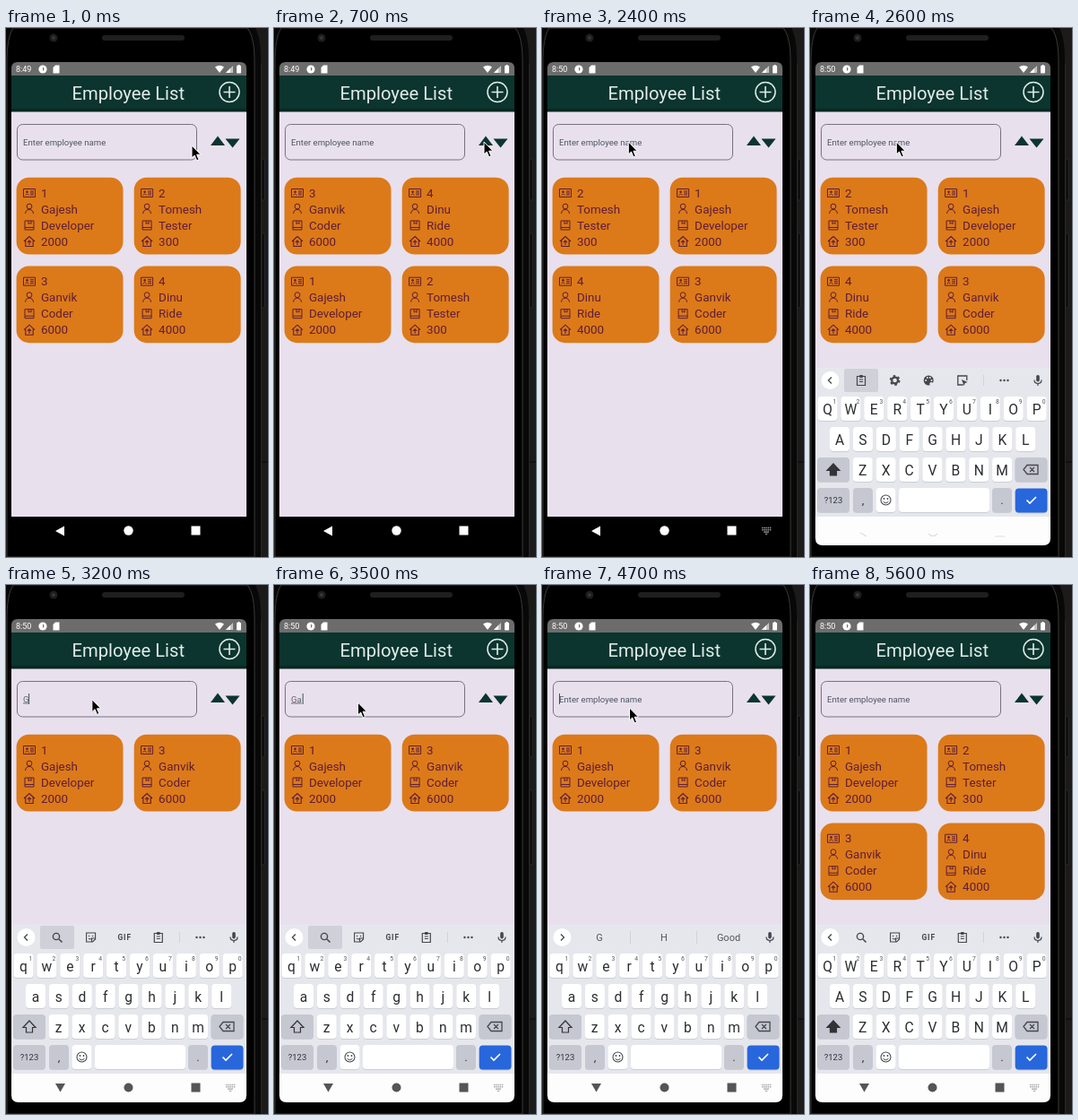
An HTML page for the animation above (5.8 s loop, 292 by 590 pixels).

```html
<!DOCTYPE html>
<html lang="en">
<head>
<meta charset="utf-8">
<title>Employee List</title>
<style>
html, body { margin: 0; width: 100%; height: 100%; overflow: hidden; background: #1c1b19; }
svg { display: block; width: 292px; height: 590px; font-family: Roboto, Arial, sans-serif; }
</style>
</head>
<body>
<svg id="stage" viewBox="0 0 292 590"></svg>
<script>
const LOOP = 5800, STEP = 100;
const stage = document.getElementById('stage');
const GREEN = '#0b352e', INK = '#5f1d35', KEY = '#45474d';

const people = {
  1: ['Gajesh', 'Developer', 2000],
  2: ['Tomesh', 'Tester', 300],
  3: ['Ganvik', 'Coder', 6000],
  4: ['Dinu', 'Ride', 4000]
};

// [time, value] lists: the last entry reached is the current value
const pick = (list, t) => list.filter(e => e[0] <= t).pop()[1];
const orders = [[0, [1, 2, 3, 4]], [500, [3, 4, 1, 2]], [1400, [2, 1, 4, 3]], [3200, [1, 3]], [4900, [1, 2, 3, 4]]];
const typed = [[0, ''], [3200, 'G'], [3400, 'Ga'], [4300, 'G'], [4600, '']];
const pointer = [[0, 207, 131], [300, 234, 127], [700, 234, 127], [1200, 250, 129], [1800, 250, 129],
  [2300, 96.3, 127], [3100, 96.3, 127], [3500, 93.5, 131], [4200, 93.5, 131], [4700, 97.5, 137], [4900, 97.5, 137], [5400, 270, 122]];

const rect = (x, y, w, h, fill, r = 0, more = '') =>
  `<rect x="${x}" y="${y}" width="${w}" height="${h}" rx="${r}" fill="${fill}" ${more}/>`;
const disc = (x, y, r, fill, more = '') => `<circle cx="${x}" cy="${y}" r="${r}" fill="${fill}" ${more}/>`;
const shape = (d, fill, more = '') => `<path d="${d}" fill="${fill}" ${more}/>`;
const line = (d, color, w = 1) => shape(d, 'none', `stroke="${color}" stroke-width="${w}"`);
const text = (x, y, s, size, fill, more = '') =>
  `<text x="${x}" y="${y}" font-size="${size}" fill="${fill}" ${more}>${s}</text>`;
const mid = (x, y, s, size, fill, more = '') => text(x, y, s, size, fill, 'text-anchor="middle" ' + more);
const at = (x, y, body) => `<g transform="translate(${x} ${y})">${body}</g>`;

function phone() {
  return rect(0, 0, 292, 590, '#1c1b19') +
    shape('M-4 0H278C283 10 284 22 284 40V590H-4Z', '#080808') +
    shape('M8 0C3 8 1 20 1 40V590H277V40C277 20 275 8 269 0Z', '#000', 'stroke="#3a3a38"') +
    line('M284.5 40V590', '#292825') +
    rect(285, 146, 3, 46, '#090909', 1, 'stroke="#3b3a36" stroke-width=".6"') +
    rect(285, 229, 3, 83, '#090909', 1, 'stroke="#3b3a36" stroke-width=".6"') +
    rect(285, 483.5, 7, 1, '#080808') +
    disc(53, 11, 4.5, '#1d1d1f') + disc(53, 11, 2, '#36363b') +
    rect(107, 8, 92, 6, '#1f1f1f', 3);
}

function topBar(t) {
  return shape('M6 53V45Q6 38 13 38H261Q268 38 268 45V53Z', '#6d6c6d') +
    text(11, 49, t < 900 ? '8:49' : '8:50', 9, '#fff') +
    disc(41, 46, 4.6, '#fff') + shape('M41 43.5A2.5 2.5 0 0 1 41 48Z', '#6d6c6d') +
    shape('M52.5 44L55 41.5H59.5V50.5H52.5Z', '#fff') +
    shape('M233 43.5Q238 40 243 43.5L238 50Z', '#fff') +
    shape('M245 50L253 42V50Z', '#c4c4c4') + shape('M245 50L250 45V50Z', '#fff') +
    rect(257, 42, 5, 8.5, '#fff', .7) + rect(258.5, 41, 2, 2, '#fff') +
    rect(6, 53, 262, 40, GREEN) + rect(6, 90, 262, 3.5, '#082820') +
    mid(136.3, 80, 'Employee List', 20.2, '#e2ecea') +
    disc(249, 71.5, 11, 'none', 'stroke="#e2ecea" stroke-width="1.5"') +
    line('M242.5 71.5H255.5M249 65V78', '#e2ecea', 1.6);
}

function search(t) {
  const value = pick(typed, t), end = value ? 19 + 6.6 * value.length : 19.5;
  return rect(12.5, 107.5, 200, 39.5, 'none', 6, 'stroke="#77727e"') +
    (value ? text(19, 130.5, value, 9.6, '#65616b', 'text-decoration="underline"')
           : text(19, 130.5, 'Enter employee name', 9.6, '#4d5562')) +
    (t >= 3200 && t < 4900 ? line(`M${end} 121V133`, '#315b58') : '') +
    shape('M228 131L236 120.5L244 131Z', t === 400 ? '#bdb5c3' : GREEN) +
    shape('M244.5 123.5H260.5L252.5 133.5Z', t === 1300 ? '#bdb5c3' : GREEN);
}

const cardIcons =
  line('M7.5 12.5H20.5V21.5H7.5ZM9.5 19.5Q11.5 16.5 13.5 19.5M15 15H19M15 17H19M15 19H19', INK) +
  disc(11.5, 15.7, 1.3, INK) +
  disc(14, 32, 2.9, 'none', `stroke="${INK}"`) + line('M9.5 40Q10 35.5 14 35.5T18.5 40', INK) +
  line('M9 48H19V58H9ZM9 55.5H19M13 48V51.5L14.5 50.5L16 51.5V48', INK) +
  line('M8 71L14 65.5L20 71M9.8 70V76.5H18.2V70M14 75V70M12 72.2L14 70L16 72.2', INK, 1.1);

function card(id, i) {
  const rows = [id, ...people[id]];
  return at(12 + i % 2 * 131.1, 167 + (i >> 1) * 98.7, rect(-.4, -.3, 118.9, 85.8, '#dc7a1a', 14) + cardIcons +
    rows.map((s, n) => text(27, 21.6 + n * 18, s, 13.4, INK)).join(''));
}

const keyboardIcon = color => at(250, 560.5,
  line('M-5 -3H5.5M-5 -.8H5.5', color, 1.5).replaceAll('/>', ' stroke-dasharray="1.5 .7"/>') +
  line('M-3 1.6H3', color, 1.3) + shape('M-1.8 3.2H1.8L0 5Z', color));

function homeNav(t) {
  return shape('M55 561L65 555.5V566.5Z', '#fff') + disc(136.5, 560.5, 5.2, '#fff') +
    rect(206.5, 555.5, 10, 10, '#fff') + (t >= 2400 ? keyboardIcon('#999') : '');
}

const glyph = {
  clip: line('M-4.5 -4.5H4.5V5.5H-4.5ZM-2 -1H2M-2 1.5H2', KEY, 1.2) + rect(-2, -6, 4, 3, KEY, 1),
  gear: disc(0, 0, 3.4, 'none', `stroke="${KEY}" stroke-width="2.2"`) +
    disc(0, 0, 5, 'none', `stroke="${KEY}" stroke-width="1.8" stroke-dasharray="2.6 2.64"`),
  palette: disc(0, 0, 5.5, KEY) +
    [[-3, 0], [-1.4, -3], [1.6, -3], [3.3, 0]].map(p => disc(...p, 1, '#e5e7ed')).join('') + disc(3, 4, 2, '#e5e7ed'),
  resize: line('M1 5H-5V-5H5V0', KEY, 1.3) + shape('M-1 -1L6 2L3 3L2 6Z', KEY),
  find: disc(-1, -1, 3.6, 'none', `stroke="${KEY}" stroke-width="1.4"`) + line('M2 2L5.5 5.5', KEY, 1.6),
  sticker: line('M-5 -5H5V2L2 5H-5ZM5 1H1V5M-2.5 1Q-1 3 1 1', KEY, 1.1) + disc(-2, -1.5, .8, KEY) + disc(2, -1.5, .8, KEY),
  gif: mid(0, 3, 'GIF', 8.5, KEY, 'font-weight="700" letter-spacing=".8"'),
  dots: [-4, 0, 4].map(x => disc(x, 0, 1.2, KEY)).join(''),
  mic: rect(-1.8, -6, 3.6, 7.5, KEY, 1.8) + line('M-4 -.5Q-4 3.5 0 3.5T4 -.5M0 3.5V6', KEY, 1.2)
};

function toolbar(t) {
  const words = t >= 4300 && t < 4900;
  let s = disc(22.5, 393, 10, '#fff') +
    line(words ? 'M21 389.5L24.5 393L21 396.5' : 'M24 389.5L20.5 393L24 396.5', KEY, 1.3) + at(254, 393, glyph.mic);
  if (words) {
    return s + ['G', 'H', 'Good'].map((w, i) => mid(64 + 72 * i, 397, w, 11, '#55575d')).join('') +
      line('M98.5 386V400M172.5 386V400', '#cfd1d8');
  }
  if (t < 3700) s += rect(38, 380, 38, 26, '#cfd0d8', 2);
  const names = t < 2800 ? ['clip', 'gear', 'palette', 'resize'] : ['find', 'sticker', 'gif', 'clip'];
  return s + names.map((n, i) => at(57 + 37.6 * i, 393, glyph[n])).join('') +
    line('M193.5 387V399', '#d2d4da') + at(216.5, 393, glyph.dots);
}

const key = (x, y, w, fill = '#fff') => rect(x, y + 1, w, 27, '#cbcdd4', 4) + rect(x, y, w, 27, fill, 4);

function keyRow(letters, x, y, upper) {
  return [...letters].map((c, i) => {
    const cx = x + 25.9 * i;
    return key(cx - 11, y, 22) + mid(cx, y + 19.5, upper ? c.toUpperCase() : c, 15.6, '#2c2d32') +
      (letters.length === 10 ? mid(cx + 8, y + 8, (i + 1) % 10, 6.8, '#55575d') : '');
  }).join('');
}

function keyboard(t) {
  const upper = t < 3200 || t >= 4900, gray = '#c6c8d1';
  const keys = rect(6, 379, 262, 167, '#e5e7ed') + toolbar(t) +
    keyRow('qwertyuiop', 19.5, 411, upper) +
    keyRow('asdfghjkl', 33, 445, upper) +
    keyRow('zxcvbnm', 58.7, 479, upper) +
    key(8, 479, 36, gray) +
    shape('M26 486L33 493.5H29.5V499H22.5V493.5H19Z', upper ? '#333438' : 'none', 'stroke="#333438" stroke-width="1.2"') +
    key(228.5, 479, 36, gray) +
    line('M238 492.5L242 487.5H254V497.5H242ZM245 490L250 495M250 490L245 495', KEY, 1.3) +
    key(8, 513, 36, gray) + mid(26, 530, '?123', 9.5, '#333438') +
    key(48, 513, 22, gray) + mid(59, 531, ',', 13, '#333438') +
    key(73.5, 513, 22) + disc(84.5, 526.5, 5.5, 'none', `stroke="${KEY}" stroke-width="1.1"`) +
    disc(82.5, 525, .9, KEY) + disc(86.5, 525, .9, KEY) + line('M81.5 528Q84.5 531.5 87.5 528', KEY) +
    key(99, 513, 101) + key(203, 513, 22, gray) + mid(214, 531, '.', 13, '#333438') +
    key(228.7, 513.4, 35.8, '#2866dc') + line('M241.5 526.5L245 530L252 523', '#fff', 1.7);
  // while the panel opens, only the lower edges of the navigation icons show
  const nav = t < 2700
    ? line('M56 563L63 567M132 564Q137 569 142 564M206 567H217', '#dedee3', 1.2)
    : shape('M55 556H66L60.5 565.5Z', '#555') + disc(136.5, 560.5, 5, '#555') +
      rect(206.5, 555.5, 10, 10, '#555') + keyboardIcon('#aaa');
  return at(0, t < 2600 ? 70 : 0, keys) +
    shape('M6 545H268V569Q268 577 260 577H14Q6 577 6 569Z', '#fdfdfe') + nav;
}

function mouse(t) {
  if (t >= 5400) return '';
  const n = pointer.findIndex(p => p[0] > t), a = pointer[n - 1], b = pointer[n];
  const k = (t - a[0]) / (b[0] - a[0]), u = k * k * (3 - 2 * k);
  return at(a[1] + (b[1] - a[1]) * u, a[2] + (b[2] - a[2]) * u,
    shape('M0 0V14L3.2 11L5.6 16.8L8 15.8L5.6 10.2H10Z', '#000', 'stroke="#fff"'));
}

function draw(t) {
  stage.innerHTML = phone() + rect(6, 93, 262, 452, '#e9e0ee') + topBar(t) + search(t) +
    pick(orders, t).map(card).join('') + (t < 2500 ? homeNav(t) : keyboard(t)) + mouse(t);
}

const start = performance.now();
let last = -1;
function tick() {
  const t = Math.floor((performance.now() - start) % LOOP / STEP) * STEP;
  if (t !== last) draw(last = t);
  requestAnimationFrame(tick);
}
tick();
</script>
</body>
</html>
```
